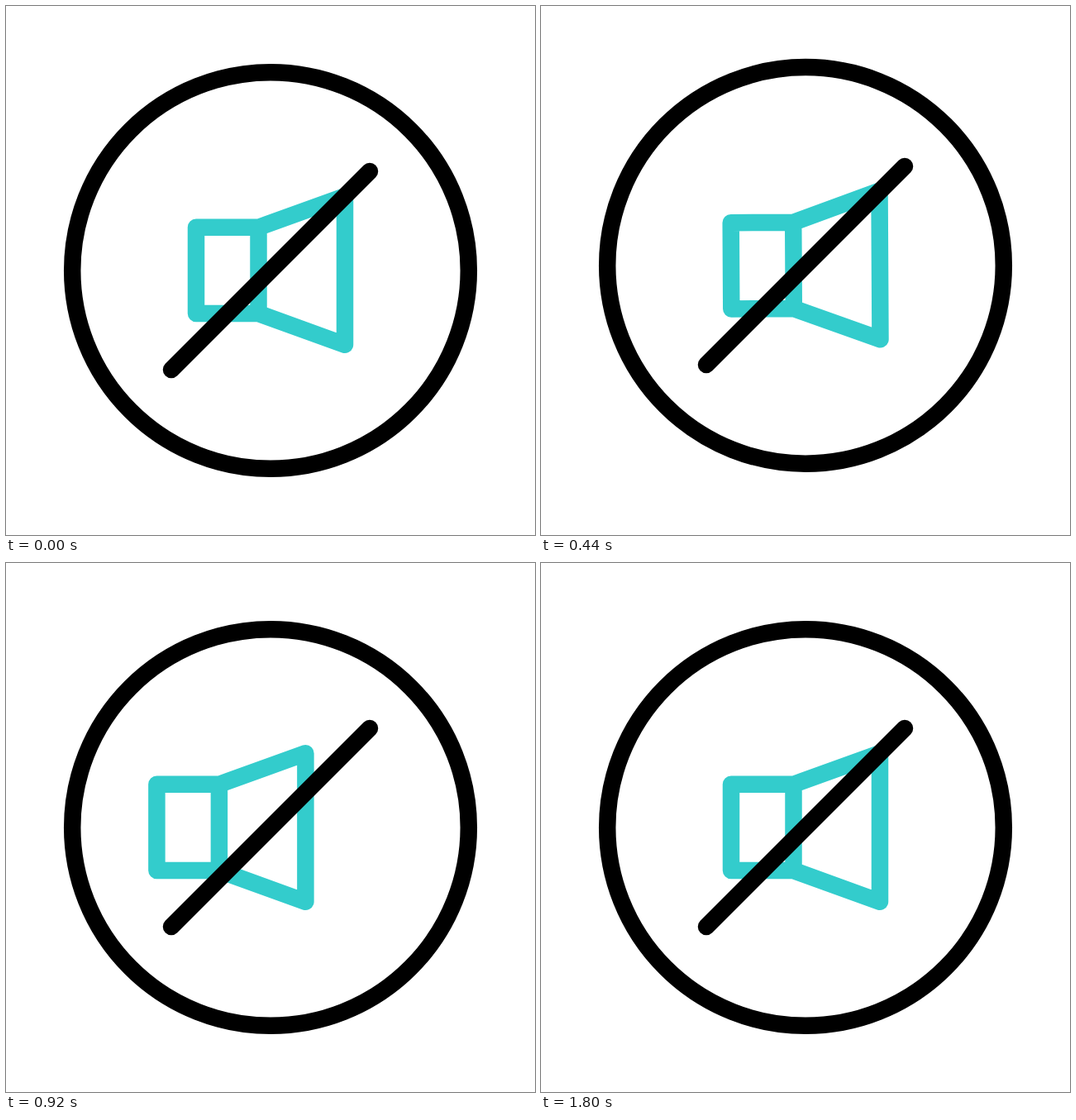
An HTML page for the animation above (2 s loop, 640 by 640 pixels).

```html
<!DOCTYPE html>
<html lang="en">
<head>
<meta charset="utf-8">
<title>Muted speaker</title>
<style>
  html, body { margin: 0; width: 100%; height: 100%; overflow: hidden; background: #fff; }
  svg { display: block; width: 100%; height: 100%; }
  svg * { fill: none; stroke-width: 20.5; stroke-linecap: round; stroke-linejoin: round; }
  .ink { stroke: #000; }
  .teal { stroke: #33cccc; }
</style>
</head>
<body>
<svg viewBox="0 0 640 640">
  <g id="icon">
    <circle class="ink" cx="320" cy="320" r="239.8"/>
    <path id="speaker" class="teal" d="M305.5 267.8H230V372H305.5L410 409.8V230.2L305.5 267.8V372"/>
    <path id="slash" class="ink"/>
  </g>
</svg>
<script>
  const LOOP = 2000, STEP = 40;

  // Each track lists [time, value]; values ease in and out between entries.
  const tracks = {
    lift:  [[40, 0], [280, 40], [560, -36], [800, 0]],
    tilt:  [[40, 0], [280, 10], [560, -7], [800, 0]],
    slide: [[680, 0], [920, -47.6], [1240, -47.6], [1520, 36], [1720, 0]],
    wipe:  [[920, 0], [1240, 1]],
    draw:  [[1720, 0], [1800, 1]]
  };

  const [icon, speaker, slash] =
    ['icon', 'speaker', 'slash'].map(id => document.getElementById(id));

  const ease = u => u * u * (3 - 2 * u);

  function valueAt(track, t) {
    if (t <= track[0][0]) return track[0][1];
    for (let i = 1; i < track.length; i++) {
      const [t0, a] = track[i - 1], [t1, b] = track[i];
      if (t <= t1) return a + (b - a) * ease((t - t0) / (t1 - t0));
    }
    return track[track.length - 1][1];
  }

  function render(t) {
    const at = name => valueAt(tracks[name], t);
    icon.setAttribute('transform', `translate(0 ${at('lift')})`);
    speaker.setAttribute('transform',
      `translate(${at('slide')} 0) rotate(${at('tilt')} 320 320)`);

    // The slash retracts to its upper end, then is struck again from below.
    const redraw = t >= 1720;
    const from = redraw ? 0 : at('wipe');
    const to = redraw ? at('draw') : 1;
    const point = u => `${200 + 240 * u} ${440 - 240 * u}`;
    slash.setAttribute('d', `M${point(from)}L${point(to)}`);
    slash.style.display = from < 1 ? '' : 'none';
  }

  const start = performance.now();
  function tick() {
    const t = (performance.now() - start) % LOOP;
    render(Math.floor(t / STEP) * STEP);
    requestAnimationFrame(tick);
  }
  tick();
</script>
</body>
</html>
```
